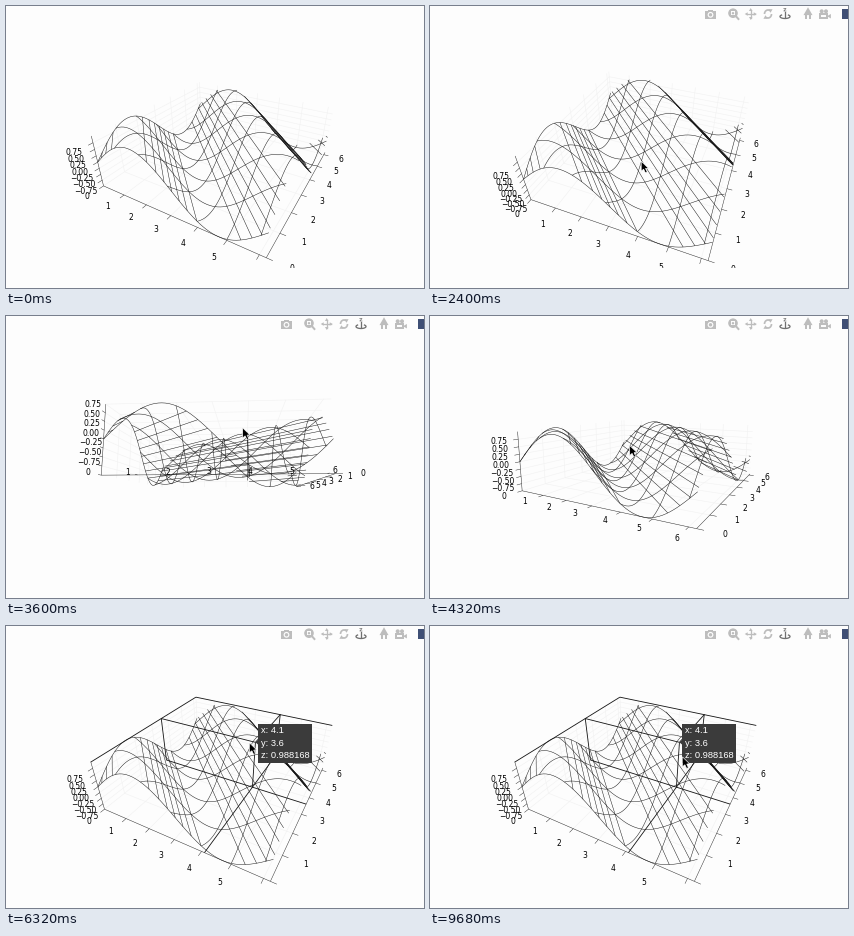
Recreate the animation shown at these times as a matplotlib script. Size 418 px wide and 282 px high, loop 9.76 s.

```python
import numpy as np
import matplotlib.pyplot as plt
from matplotlib.animation import FuncAnimation
from matplotlib.collections import LineCollection
from matplotlib.patches import Arc, Circle, Polygon, Rectangle

W, H, DPI = 418, 282, 100
STEP, LOOP = 80, 9760
SCENE_H = 262                      # the 3D canvas is cut off below this
PX = 72 / DPI                      # points per pixel
BG, INK, TIP = "#fdfdfd", "#161616", "#3b3b3b"
TOP = 6.2                          # data range of x and y
FOCAL, DIST, CENTER = 306, 1.82, (217.5, 139.3)
GAP = 0.112 * TOP                  # tick label distance
TICK = 0.03 * TOP
TICKS = range(7)
LEVELS = np.linspace(-0.75, 0.75, 7)

BAR_ON, HOVER_ON, DRAG_ON, DRAG_OFF, DROP = 240, 720, 2000, 5120, 9680

# key moments: time, then the values reached
POSE = [(1920, -60, 30), (2320, -68, 40), (2960, -79, 17.5), (3600, -86, -9),
        (4320, -60.5, 10.5), (4720, -62, 42), (5040, -62, 34)]
HOVER_A = [(800, 3.9, 2.3), (1120, 4.6, 3.2), (1600, 4.7, 1.4), (1840, 2.3, 3.1)]
HOVER_B = [(5280, 3.1, 3.2), (5760, 4.8, 2.4), (6320, 4.1, 3.6)]
ENTRY = [(320, 398, 44), (720, 205, 138)]


def glide(keys, t):
    """Ease from one key moment to the next."""
    times, *values = np.transpose(keys)
    u = np.interp(t, times, np.arange(len(times)))
    k = np.floor(u)
    u = k + (1 - np.cos(np.pi * (u - k))) / 2
    return [np.interp(u, np.arange(len(times)), v) for v in values]


def height(x, y):
    return np.sin(x + y)


class Camera:
    def __init__(self, azim, elev):
        a, e = np.radians([azim, elev])
        self.below = elev < 0
        self.right = np.array([-np.sin(a), np.cos(a), 0])
        self.eye = np.array([np.cos(e) * np.cos(a), np.cos(e) * np.sin(a), np.sin(e)])
        self.up = np.cross(self.eye, self.right)

    def __call__(self, pts):
        p = np.asarray(pts, float) / TOP - [0.5, 0.5, 0]
        k = FOCAL / (DIST - p @ self.eye)
        return np.stack([CENTER[0] + k * (p @ self.right),
                         CENTER[1] - k * (p @ self.up)], -1)


def hover_at(t):
    if t < HOVER_ON or DRAG_ON <= t < DRAG_OFF:
        return None
    x, y = np.round(glide(HOVER_A if t < DRAG_ON else HOVER_B, t), 1)
    return x, y, height(x, y)


def pointer_at(t, azim, elev, spot):
    if spot is None:
        if t < HOVER_ON:
            return np.array(glide(ENTRY, t))
        return np.array([199 - 1.45 * (azim + 60), 120 + 0.9 * elev])
    return spot + [-6, 0.5] + (np.array([9, 14]) if t >= DROP else 0)


def contours():
    u = np.linspace(0, TOP, 63)
    lines = []
    for c in TICKS:
        k, z = np.full_like(u, c), height(c, u)
        lines += [np.stack([k, u, z], 1), np.stack([u, k, z], 1)]
    # level lines run along x + y = s
    for z in LEVELS:
        for first in (np.arcsin(z), np.pi - np.arcsin(z)):
            for s in first + 2 * np.pi * np.arange(3):
                if 0 < s < 2 * TOP:
                    ends = max(0, s - TOP), min(TOP, s)
                    lines.append(np.array([(x, s - x, z) for x in ends]))
    return lines


def wall_grid(floor):
    lines = []
    for c in TICKS:
        lines += [[(c, 0, floor), (c, TOP, floor)], [(0, c, floor), (TOP, c, floor)],
                  [(0, c, -1), (0, c, 1)], [(c, TOP, -1), (c, TOP, 1)]]
    for z in LEVELS:
        lines += [[(0, 0, z), (0, TOP, z)], [(0, TOP, z), (TOP, TOP, z)]]
    return lines


def axis_lines():
    lines = [[(0, 0, -1), (TOP, 0, -1)], [(TOP, 0, -1), (TOP, TOP, -1)],
             [(0, 0, -1), (0, 0, 1)]]
    for c in TICKS:
        lines += [[(c, 0, -1), (c, -TICK, -1)], [(TOP, c, -1), (TOP + TICK, c, -1)]]
    return lines + [[(0, 0, z), (0, -TICK, z)] for z in LEVELS]


def spikes(x, y, z):
    p = (x, y, z)
    return [[p, (0, y, z)], [p, (x, TOP, z)], [p, (x, y, -1)],
            [(0, 0, z), (0, TOP, z)], [(0, y, -1), (0, y, 1)],
            [(0, TOP, z), (TOP, TOP, z)], [(x, TOP, -1), (x, TOP, 1)],
            [(x, 0, -1), (x, TOP, -1)], [(0, y, -1), (TOP, y, -1)]]


def minus(s):
    return s.replace("-", "\u2212")


fig = plt.figure(figsize=(W / DPI, H / DPI), dpi=DPI, facecolor=BG)


def layer(h, z):
    ax = fig.add_axes([0, 1 - h / H, 1, h / H], zorder=z)
    ax.set(xlim=(0, W), ylim=(h, 0))
    ax.axis("off")
    return ax


scene, over = layer(SCENE_H, 1), layer(H, 2)


def strokes(color, width, z):
    lc = LineCollection([], colors=color, linewidths=width * PX, zorder=z)
    return scene.add_collection(lc)


grid = strokes("#f2f2f2", 0.6, 1)
mesh = strokes(INK, 0.48, 2)
frame_lines = strokes("#222222", 0.45, 3)
spike_lines = strokes(INK, 0.85, 4)

MESH, AXES = contours(), axis_lines()
LABELS = [(str(c), (c, -GAP, -1)) for c in TICKS]
LABELS += [(str(c), (TOP + GAP, c, -1)) for c in TICKS]
LABELS += [(minus(f"{z:.2f}"), (0, -GAP, z)) for z in LEVELS]
ANCHORS = [p for _, p in LABELS]
texts = [scene.text(0, 0, s, family="DejaVu Sans", size=7.7 * PX, ha="center",
                    va="center", color="black", clip_on=True, zorder=5)
         for s, _ in LABELS]

tip = over.text(0, 0, "", family="Liberation Sans", size=9.3 * PX, color="white",
                va="center", linespacing=1.5, zorder=6,
                bbox=dict(boxstyle="square,pad=0.27", fc=TIP, ec="none"))
tip_arrow = over.add_patch(Polygon([(0, 0)] * 3, fc=TIP, ec="none", zorder=6))
ARROW = np.array([(0, 0), (0, 10), (2.4, 7.9), (4.2, 11.6), (6, 10.8), (4.3, 7.2), (7.2, 7)])
pointer = over.add_patch(Polygon(ARROW, fc="black", ec="white", lw=0.6 * PX, zorder=8))


def toolbar():
    """Icons are placed by their centre on one row."""
    row, gray, dark = 8, "#bdbdbd", "#707070"
    items = []

    def add(patch):
        items.append(over.add_patch(patch))

    def rect(x, y, w, h, c=gray):
        add(Rectangle((x - w / 2, row + y - h / 2), w, h, fc=c, ec="none"))

    def disc(x, y, r, c=gray):
        add(Circle((x, row + y), r, fc=c, ec="none"))

    def tri(x, y, r, angle, c=gray):
        a = np.radians(angle + 120 * np.arange(3))
        add(Polygon(np.stack([x + r * np.cos(a), row + y + r * np.sin(a)], 1), fc=c, ec="none"))

    def arc(x, y, w, h, a, b, c=gray, lw=1.3):
        add(Arc((x, row + y), w, h, theta1=a, theta2=b, ec=c, lw=lw * PX))

    def line(xs, ys, c=gray, lw=1.3):
        items.extend(over.plot(xs, np.add(ys, row), color=c, lw=lw * PX))

    # camera
    rect(280.5, 0.8, 11, 8)
    rect(280.5, -3.5, 5, 2)
    disc(280.5, 0.8, 2.9, BG)
    disc(280.5, 0.8, 1.7)
    # zoom
    disc(303, -0.8, 4.8)
    rect(303, -0.8, 4, 4, BG)
    disc(303, -0.8, 1.2)
    line([305.8, 308.4], [2, 5], lw=2)
    # pan
    line([316.5, 325], [0, 0])
    line([320.7, 320.7], [-4, 4])
    for a in (0, 90, 180, 270):
        c, s = np.cos(np.radians(a)), np.sin(np.radians(a))
        tri(320.7 + 4 * c, 4 * s, 2, a)
    # orbit
    for side in (1, -1):
        arc(338, 0, 7, 8, 90 - 90 * side, 210 - 90 * side, lw=1.7)
        tri(338 + 2.5 * side, -3.6 * side, 2.4, -30 * side)
    # turntable
    line([353.8, 356, 353.8, 356], [-5.5, -5.5, -3, -3], dark, 0.7)
    line([355, 355], [-2, 3], dark)
    arc(355, 2.5, 10, 4, -30, 210, dark)
    # home
    tri(378, -1.5, 5.2, -90)
    rect(376, 2.5, 2.8, 5)
    rect(380, 2.5, 2.8, 5)
    # movie camera
    rect(393.5, 2.2, 8.5, 5.5)
    rect(393.5, 2.2, 5, 2, BG)
    for x in (391.7, 396):
        disc(x, -2.7, 2)
    tri(399.6, 2.2, 2.6, 180)
    # brand mark as a plain square
    rect(417.3, 0, 10, 10, "#3f4f75")
    return items


bar = toolbar()


def draw(i):
    t = i * STEP
    azim, elev = glide(POSE, t)
    cam, point = Camera(azim, elev), hover_at(t)
    spot = None if point is None else cam(point)

    grid.set_segments(cam(wall_grid(1 if cam.below else -1)))
    mesh.set_segments([cam(m) for m in MESH])
    frame_lines.set_segments(cam(AXES))
    for label, pos in zip(texts, cam(ANCHORS)):
        label.set_position(pos)

    for part in (tip, tip_arrow, spike_lines):
        part.set_visible(point is not None)
    if point is not None:
        x, y, z = point
        digits = 6 if abs(z) > 0.8 else 7
        spike_lines.set_segments(cam(spikes(x, y, z)))
        tip.set_text(minus(f"x: {x:.1f}\ny: {y:.1f}\nz: {z:.{digits}f}"))
        tip.set_position(spot + [5.5, 1])
        tip_arrow.set_xy(spot + [(0, 0), (3.5, -3), (3.5, 3)])

    for part in bar + [pointer]:
        part.set_visible(t >= BAR_ON)
    pointer.set_xy(ARROW + pointer_at(t, azim, elev, spot))
    return []


anim = FuncAnimation(fig, draw, frames=LOOP // STEP, interval=STEP,
                     repeat=True, repeat_delay=0, blit=False)
plt.show()
```
